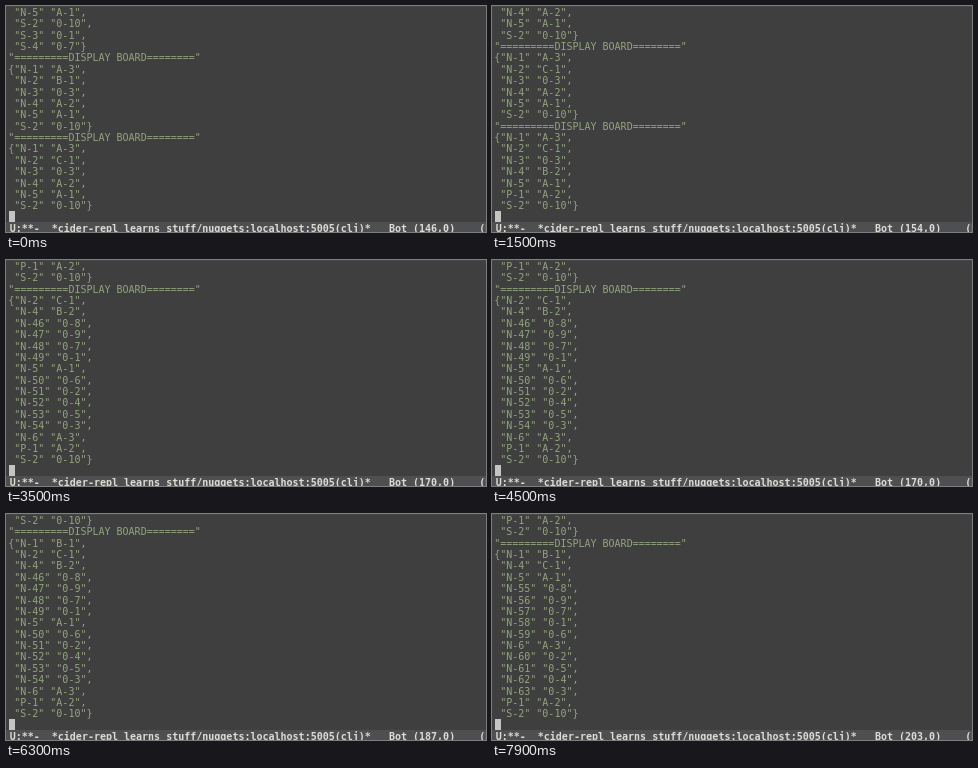
Write an HTML page that moves like this. It is 480 px wide and 226 px high and loops after 8000 ms.

```html
<!DOCTYPE html>
<html lang="en">
<head>
<meta charset="utf-8">
<title>REPL board log</title>
<style>
  html, body { margin: 0; width: 100%; height: 100%; overflow: hidden; background: #3f3f3f; }
  #stage { position: relative; width: 480px; height: 226px; overflow: hidden; }
  #stage::before { content: ""; position: absolute; width: 480px; height: 1px; background: #464646; }
  pre {
    position: absolute; margin: 0;
    font: 10px/11.39px "DejaVu Sans Mono", monospace;
    font-variant-ligatures: none;
  }
  #log { left: 2.2px; top: 0.8px; color: #92a37e; }
  #cursor { position: absolute; left: 3px; top: 205px; width: 6px; height: 11px; background: #c4c4c2; }
  #bar { position: absolute; left: 0; top: 216px; width: 480px; height: 10px; background: #4e4f50; }
  #mode { left: -2.4px; top: 216.5px; color: #dcdcd4; font-weight: bold; }
</style>
</head>
<body>
<div id="stage">
  <pre id="log"></pre>
  <div id="cursor"></div>
  <div id="bar"></div>
  <pre id="mode"></pre>
</div>
<script>
const LOOP = 8000, ROWS = 18, FIRST_LINE = 146;
const HEADER = '"=========DISPLAY BOARD========"';

// "N-1 A-3, S-2 0-10" -> lines of a printed map
function printMap(spec) {
  const pairs = spec.split(', ');
  return pairs.map((pair, i) => {
    const [key, value] = pair.split(' ');
    const end = i === pairs.length - 1 ? '}' : ',';
    return `${i ? ' ' : '{'}"${key}" "${value}"${end}`;
  });
}

const board = spec => [HEADER, ...printMap(spec)];

const start = [
  ...printMap('N-4 A-2, N-5 A-1, S-2 0-10, S-3 0-1, S-4 0-7').slice(1),
  ...board('N-1 A-3, N-2 B-1, N-3 0-3, N-4 A-2, N-5 A-1, S-2 0-10'),
  ...board('N-1 A-3, N-2 C-1, N-3 0-3, N-4 A-2, N-5 A-1, S-2 0-10')
];

const crowd = 'N-4 B-2, N-46 0-8, N-47 0-9, N-48 0-7, N-49 0-1, N-5 A-1, N-50 0-6, ' +
  'N-51 0-2, N-52 0-4, N-53 0-5, N-54 0-3, N-6 A-3, P-1 A-2, S-2 0-10';

const prints = [
  [1500, 'N-1 A-3, N-2 C-1, N-3 0-3, N-4 B-2, N-5 A-1, P-1 A-2, S-2 0-10'],
  [3500, 'N-2 C-1, ' + crowd],
  [5500, 'N-1 B-1, N-2 C-1, ' + crowd],
  [7500, 'N-1 B-1, N-4 C-1, N-5 A-1, N-55 0-8, N-56 0-9, N-57 0-7, N-58 0-1, N-59 0-6, ' +
    'N-6 A-3, N-60 0-2, N-61 0-5, N-62 0-4, N-63 0-3, P-1 A-2, S-2 0-10']
];

// Each state holds the visible tail of the log and the cursor's line number
let lines = start;
const states = [[0, null], ...prints].map(([at, spec]) => {
  if (spec) lines = lines.concat(board(spec));
  const row = FIRST_LINE + lines.length - start.length;
  return {
    at,
    log: lines.slice(-ROWS).join('\n'),
    mode: ` U:**-  *cider-repl learns stuff/nuggets:localhost:5005(clj)*   Bot (${row},0)    (REPL`
  };
});

const log = document.getElementById('log');
const mode = document.getElementById('mode');
let shown;

function draw(now) {
  const t = now % LOOP;
  const state = states.filter(s => s.at <= t).pop();
  if (state !== shown) {
    log.textContent = state.log;
    mode.textContent = state.mode;
    shown = state;
  }
}

const t0 = performance.now();
function tick() {
  draw(performance.now() - t0);
  requestAnimationFrame(tick);
}
tick();
</script>
</body>
</html>
```
